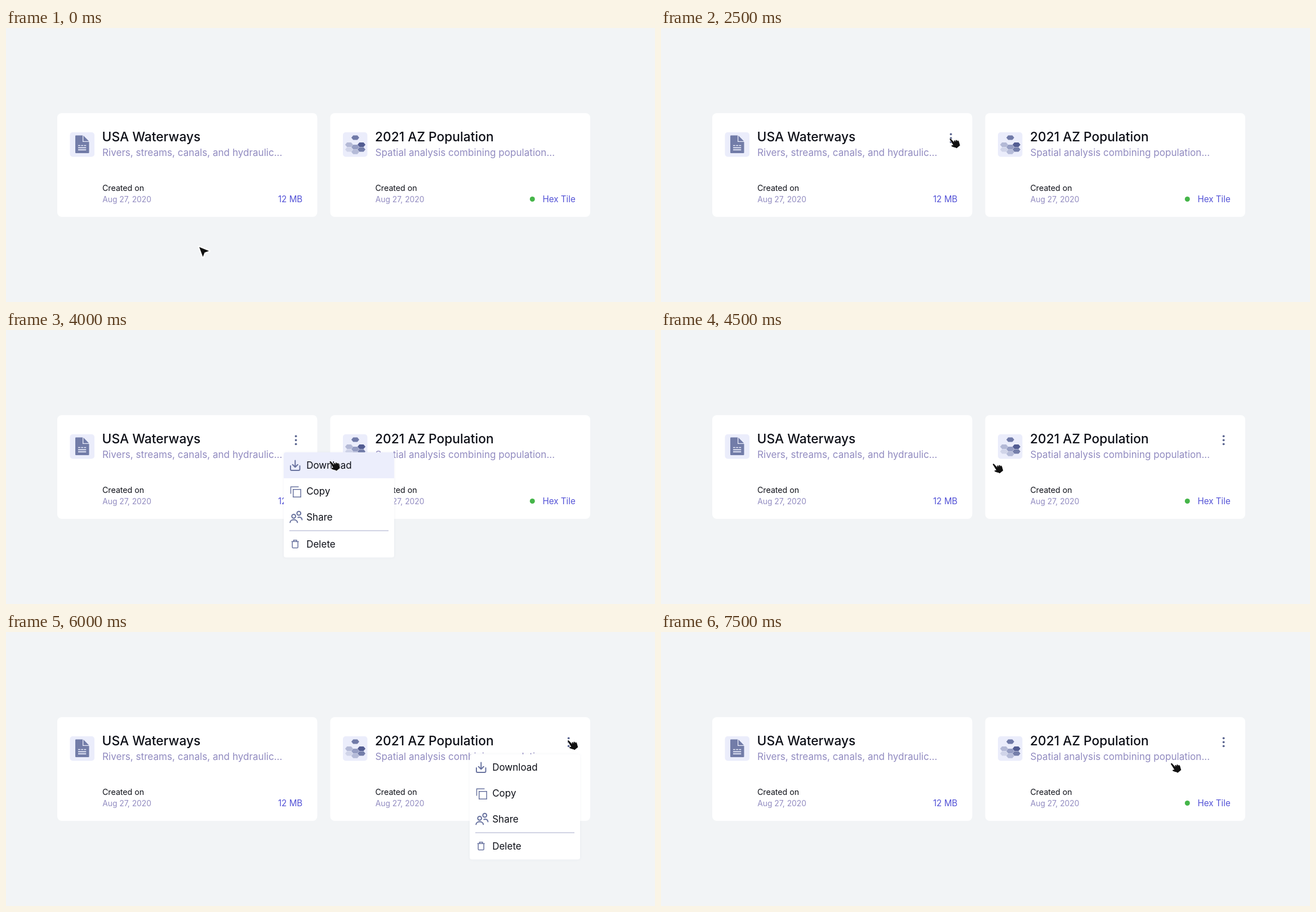
Write an HTML page that moves like this. It is 1152 by 486 pixels and loops after 8 s.

```html
<!DOCTYPE html>
<html lang="en">
<head>
<meta charset="utf-8">
<title>Dataset cards</title>
<style>
  html, body { margin: 0; width: 100%; height: 100%; overflow: hidden; background: #f2f4f6; }
  svg { display: block; width: 100vw; height: 100vh; font-family: Inter, "Liberation Sans", sans-serif; }
  .card { fill: #fff; }
  .tile { fill: #ebedfb; }
  .title { font-size: 22.75px; font-weight: 500; fill: #0d0f17; }
  .summary { font-size: 17.1px; fill: #918bc0; }
  .label { font-size: 14.2px; fill: #0d0f17; }
  .date { font-size: 13.8px; fill: #918bc0; }
  .meta { font-size: 15.2px; fill: #5251d6; text-anchor: end; }
  .item { font-size: 17px; fill: #0d0f17; }
  .dots { fill: #59648f; }
  .panel { fill: #fff; filter: drop-shadow(0 .5px 2px rgba(70, 80, 130, .07)); }
  .hover { fill: #eceefc; }
  .icon { fill: none; stroke: #69739f; stroke-width: 2; stroke-linecap: round; stroke-linejoin: round; }
  .thin { stroke-width: 1.5; stroke-linecap: butt; stroke-linejoin: miter; }
  .rule { stroke: #c2c5db; stroke-width: 1.3; }
  .cursor { fill: #111; stroke: #fff; paint-order: stroke; stroke-linejoin: round; }
</style>
</head>
<body>
<svg viewBox="0 0 1152 486" preserveAspectRatio="none">
  <defs>
    <g id="dots" class="dots">
      <circle cy="-7" r="1.9"/><circle r="1.9"/><circle cy="7" r="1.9"/>
    </g>
  </defs>
  <g id="cards"></g>
  <use id="more" href="#dots"/>
  <g id="menu">
    <rect class="panel" width="196" height="186.5" rx="4"/>
    <path id="hover" class="hover" d="M0 46V4Q0 0 4 0H192Q196 0 196 4V46Z"/>
    <g class="icon">
      <path d="M12 24V30Q12 32 14 32H26.500Q28.500 32 28.500 30V24M20.300 14.500V26M15.700 21.700L20.300 26.300L24.900 21.700"/>
      <path class="thin" d="M12.500 73.500V61.300H26.500M16.800 65.800H30.200V79.200H16.800Z"/>
      <circle cx="17.700" cy="113.300" r="3.400"/>
      <circle cx="26.800" cy="108.200" r="3.400"/>
      <path d="M11.300 124.300C12 118 23.600 118 24.300 124.300M25.300 115.500C29 114.300 32.300 116 32.500 119.500"/>
      <path class="thin" d="M13.700 158.300H26.700M17.500 158V155.800H22.900V158M15.200 158.300V168Q15.200 169.600 16.700 169.600H23.700Q25.200 169.600 25.200 168V158.300"/>
    </g>
    <path class="rule" d="M10 139H186"/>
    <g class="item" id="items"></g>
  </g>
  <path id="arrow" class="cursor" stroke-width="5" d="M343 388.500L360.300 395.600L352.500 398.300L349.500 406Z"/>
  <path id="hand" class="cursor" stroke-width="1.2" d="M.4 2Q.7 .2 2.500 1L8.300 7.300L7.900 4.600Q8.600 3.300 9.800 4.300L11.300 6.600L10.900 3.700Q11.700 2.400 12.900 3.500L14.300 6.100L14.100 4.300Q15 3.400 16 4.600Q17.300 6.300 17.600 8.700L18.800 12.700L12.700 17.700Q10.600 16 8 15.900L4 14.500Q2.700 13.300 4.300 12.600L6.800 12.200Z"/>
</svg>
<script>
const $ = id => document.getElementById(id);
const LOOP = 8000;

const docIcon = `
  <path fill="#727ca8" d="M124.200 190.500H136V202H147.500V220.800Q147.500 222 146.300 222H124.200Q123 222 123 220.800V191.700Q123 190.500 124.200 190.500ZM137.300 190.800L147.200 200.700H137.300Z"/>
  <path stroke="#ebedfb" stroke-width="1.700" d="M128 208.500h3.800m1.400 0h3.800m1.400 0h3.800M128 212.300h14.200M128 216.100h14.200"/>`;

const hex = ([x, y, color]) =>
  `<path fill="${color}" d="M${x - 7} ${y}l3.300 -4.100h7.400l3.300 4.100l-3.300 4.100h-7.400Z"/>`;

const hexIcon = [
  [620, 194.5, '#707aa8'], [609, 207, '#b3b9d6'], [631, 207, '#535d92'],
  [620, 211.2, '#959dc3'], [609, 215.5, '#d0d4e9'], [631, 215.5, '#747eaa'],
  [620, 219.7, '#b5bbd8']
].map(hex).join('');

const card = (x, icon, title, summary, meta) => `
  <rect class="card" x="${x}" y="151" width="461.500" height="184" rx="8"/>
  <rect class="tile" x="${x + 22.5}" y="185" width="43.500" height="43.500" rx="5"/>
  ${icon}
  <text class="title" x="${x + 79.6}" y="201">${title}</text>
  <text class="summary" x="${x + 80}" y="227">${summary}</text>
  <text class="label" x="${x + 80}" y="289">Created on</text>
  <text class="date" x="${x + 80.3}" y="309">Aug 27, 2020</text>
  <text class="meta" x="${x + 435.3}" y="309.300">${meta}</text>`;

$('cards').innerHTML =
  card(91, docIcon, 'USA Waterways', 'Rivers, streams, canals, and hydraulic...', '12 MB') +
  card(575.5, hexIcon, '2021 AZ Population', 'Spatial analysis combining population...', 'Hex Tile') +
  '<circle cx="934.300" cy="303.500" r="4.500" fill="#45b549"/>';

$('items').innerHTML = [['Download', 29], ['Copy', 75], ['Share', 121], ['Delete', 168.5]]
  .map(([name, y]) => `<text x="40.200" y="${y}">${name}</text>`).join('');

// Each step holds until the next one begins.
const LEFT = { dots: 514.6, menu: 493 };
const RIGHT = { dots: 998.7, menu: 823 };
const steps = [
  { at: 0 },
  { at: 2000, side: LEFT, hand: [358, 274] },
  { at: 2500, side: LEFT, hand: [512, 195.5] },
  { at: 3000, side: LEFT, hand: [512, 195.5], open: true },
  { at: 4000, side: LEFT, hand: [574, 232], open: true, hover: true },
  { at: 4500, side: RIGHT, hand: [588.5, 236.5] },
  { at: 5500, side: RIGHT, hand: [996.5, 191.5] },
  { at: 6000, side: RIGHT, hand: [996.5, 191.5], open: true },
  { at: 7000, side: RIGHT, hand: [904.5, 232], open: true, hover: true },
  { at: 7500, side: RIGHT, hand: [904.5, 232] }
];

const show = (id, on) => $(id).setAttribute('display', on ? 'inline' : 'none');
const move = (id, x, y) => $(id).setAttribute('transform', `translate(${x} ${y})`);

function draw(time) {
  const { side, hand, open, hover } = steps.findLast(step => step.at <= time);
  show('arrow', !hand);
  show('hand', hand);
  show('more', side);
  show('menu', open);
  show('hover', hover);
  if (hand) move('hand', ...hand);
  if (side) {
    move('more', side.dots, 195.3);
    move('menu', side.menu, 217);
  }
}

const start = performance.now();
function tick() {
  draw((performance.now() - start) % LOOP);
  requestAnimationFrame(tick);
}
tick();
</script>
</body>
</html>
```
